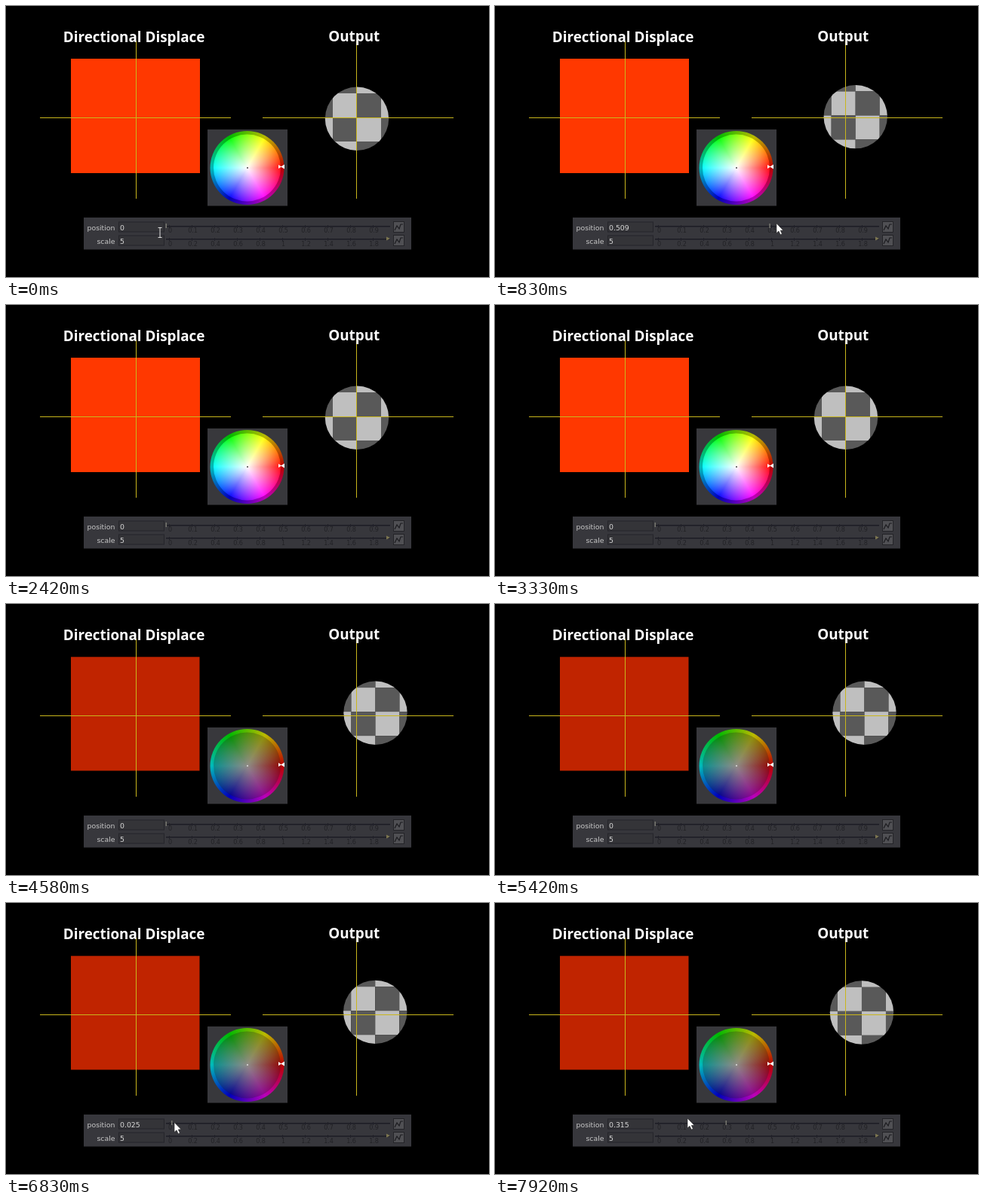
An HTML page with a canvas that plays this animation: 640 px wide and 360 px high, repeating every 8000 ms.

```html
<!DOCTYPE html>
<html lang="en">
<head>
<meta charset="utf-8">
<title>Directional Displace</title>
<style>
html, body { margin: 0; width: 100%; height: 100%; overflow: hidden; background: #000; }
canvas { display: block; width: 100vw; height: 100vh; }
</style>
</head>
<body>
<canvas width="640" height="360"></canvas>
<script>
const ctx = document.querySelector('canvas').getContext('2d');
const LOOP = 8000;
const TITLE_FONT = 'bold 18.85px "Open Sans", "Noto Sans", sans-serif';
const LABEL_FONT = '9.35px "DejaVu Sans", sans-serif';
const TICK_FONT = '8px "DejaVu Sans", sans-serif';
const AXIS = '#c9b61c';

const lerp = (a, b, u) => a + (b - a) * u;
const progress = (t, from, to) => Math.min(1, Math.max(0, (t - from) / (to - from)));
const smooth = u => u * u * (3 - 2 * u);
const sliderX = value => 212 + 298.5 * value;

function rect(x, y, w, h, fill) {
  ctx.fillStyle = fill;
  ctx.fillRect(x, y, w, h);
}

function disc(x, y, r, fill) {
  ctx.fillStyle = fill;
  ctx.beginPath();
  ctx.arc(x, y, r, 0, 2 * Math.PI);
  ctx.fill();
}

function polygon(points, fill) {
  ctx.fillStyle = fill;
  ctx.beginPath();
  points.forEach(([x, y]) => ctx.lineTo(x, y));
  ctx.closePath();
  ctx.fill();
}

function polyline(points, stroke, width = 1) {
  ctx.strokeStyle = stroke;
  ctx.lineWidth = width;
  ctx.beginPath();
  points.forEach(([x, y]) => ctx.lineTo(x, y));
  ctx.stroke();
}

function text(str, x, y, font, fill, align = 'left') {
  ctx.font = font;
  ctx.fillStyle = fill;
  ctx.textAlign = align;
  ctx.fillText(str, x, y);
}

// Three takes: bright drag, bright rest, then dim colour with a second drag.
function stateAt(t) {
  if (t < 2100) {
    const u = smooth(progress(t, 300, 1350));
    const approach = progress(t, 0, 250);
    const pointer = approach < 1
      ? { x: lerp(204, 214, approach), y: lerp(294, 289, approach), beam: approach < 0.6 }
      : { x: lerp(214, 526.5, u), y: lerp(289, 288.5, u) };
    return { dim: false, position: u, shift: u, pointer };
  }
  if (t < 3750) return { dim: false, position: 0, shift: 0 };

  const u = progress(t, 6830, 7920);
  const position = t < 6750 ? 0 : lerp(0.025, 0.315, u ** 1.2);
  const enter = smooth(progress(t, 6350, 6780));
  const pointer = t < 6350 ? null : {
    x: lerp(lerp(204, 223, enter), 255, u),
    y: lerp(lerp(312, 291.5, enter), 286, u)
  };
  return { dim: true, position, shift: 0.98 - 0.45 * position, pointer };
}

function drawBall(shift) {
  const dx = 25 * shift, dy = -5 * shift;
  ctx.save();
  ctx.beginPath();
  ctx.arc(465 + dx, 149.7 + dy, 42.2, 0, 2 * Math.PI);
  ctx.clip();
  ctx.translate(465 + dx, 148 + dy);
  for (let row = -2; row < 2; row++) {
    for (let col = -2; col < 2; col++) {
      rect(col * 32, row * 32, 32, 32, (row + col) % 2 ? '#595959' : '#bfbfbf');
    }
  }
  ctx.restore();
}

function drawAxes(x, left, right) {
  rect(left, 148, right - left, 1, AXIS);
  rect(x, 46, 1, 210, AXIS);
}

function hueGradient(x, y, level) {
  const gradient = ctx.createConicGradient(0, x, y);
  const v = Math.round(255 * level);
  [[1, 0, 0], [1, 0, 1], [0, 0, 1], [0, 1, 1], [0, 1, 0], [1, 1, 0], [1, 0, 0]]
    .forEach((rgb, i) => gradient.addColorStop(i / 6, `rgb(${rgb.map(c => c * v)})`));
  return gradient;
}

function drawWheel(dim) {
  const x = 319.5, y = 215;
  rect(267, 164, 106, 101.5, '#38383c');
  disc(x, y, 49, hueGradient(x, y, 0.73));
  disc(x, y, 44.5, hueGradient(x, y, dim ? 0.56 : 1));
  const centre = dim ? '142,140,136' : '255,255,255';
  const fade = ctx.createRadialGradient(x, y, 0, x, y, 44.5);
  fade.addColorStop(0, `rgba(${centre},1)`);
  fade.addColorStop(1, `rgba(${centre},0.06)`);
  disc(x, y, 44.5, fade);
  disc(320, 215, 1, dim ? '#ddd' : '#444');
  polygon([[361, 211], [361, 216], [365, 213.5]], '#fff');
  polygon([[369, 210.5], [369, 216.5], [364, 213.5]], '#fff');
}

function drawSlider(label, value, y, trackY, step) {
  text(label, 144.5, y + 3.5, LABEL_FONT, '#c8c8c8', 'right');
  rect(149, y - 7.5, 61, 14, '#25252a');
  rect(150, y - 6.5, 59, 12, '#343438');
  text(value, 151, y + 3.5, LABEL_FONT, '#d8d8d8');

  rect(212, trackY, 297, 1.5, '#1c1c24');
  for (let i = 0; i < 10; i++) {
    const x = 216 + 30 * i;
    rect(x, trackY - 1, 1, 4, '#202028');
    text(String(+(i * step).toFixed(1)), x + 1.5, y + 7, TICK_FONT, '#222226', 'center');
  }

  rect(513, y - 8, 15, 15, '#242428');
  rect(514, y - 7, 13, 13, '#505054');
  polyline([[515, y + 4], [518, y - 2], [521, y + 2], [523, y - 4], [526, y - 4]], '#1c1c20', 1.2);
}

function drawPanel(position) {
  rect(103, 281, 434, 42.5, '#37373c');
  drawSlider('position', String(+position.toFixed(3)), 294, 292, 0.1);
  drawSlider('scale', '5', 312, 309, 0.2);
  rect(sliderX(position) - 0.5, 289, 1.5, 6, '#77776f');
  polygon([[504, 306.5], [509, 309], [504, 311.5]], '#7c7650');
}

function drawPointer({ x, y, beam }) {
  ctx.save();
  ctx.translate(x, y);
  if (beam) {
    polyline([[-2.5, 0.5], [2.5, 0.5]], '#ddd');
    polyline([[0, 0], [0, 14]], '#ddd');
    polyline([[-2.5, 13.5], [2.5, 13.5]], '#ddd');
  } else {
    const arrow = [[0, 0], [0, 13], [3, 10.3], [5.2, 15], [7.4, 14], [5.3, 9.5], [9, 9.2]];
    polygon(arrow, '#fff');
    polyline([...arrow, arrow[0]], '#222', 0.6);
  }
  ctx.restore();
}

function draw(t) {
  const { dim, position, shift, pointer } = stateAt(t);
  rect(0, 0, 640, 360, '#000');
  if (dim) rect(86, 70.3, 170.5, 151.2, '#c02400');
  else rect(86, 70, 171, 152, '#ff3800');
  drawBall(shift);
  drawAxes(172, 45, 298);
  drawAxes(464, 340, 593);
  text('Directional Displace', 169.6, 48.2, TITLE_FONT, '#fff', 'center');
  text('Output', 461.2, 47.3, TITLE_FONT, '#fff', 'center');
  drawWheel(dim);
  drawPanel(position);
  if (pointer) drawPointer(pointer);
}

const start = performance.now();
function frame() {
  draw((performance.now() - start) % LOOP);
  requestAnimationFrame(frame);
}
frame();
</script>
</body>
</html>
```
